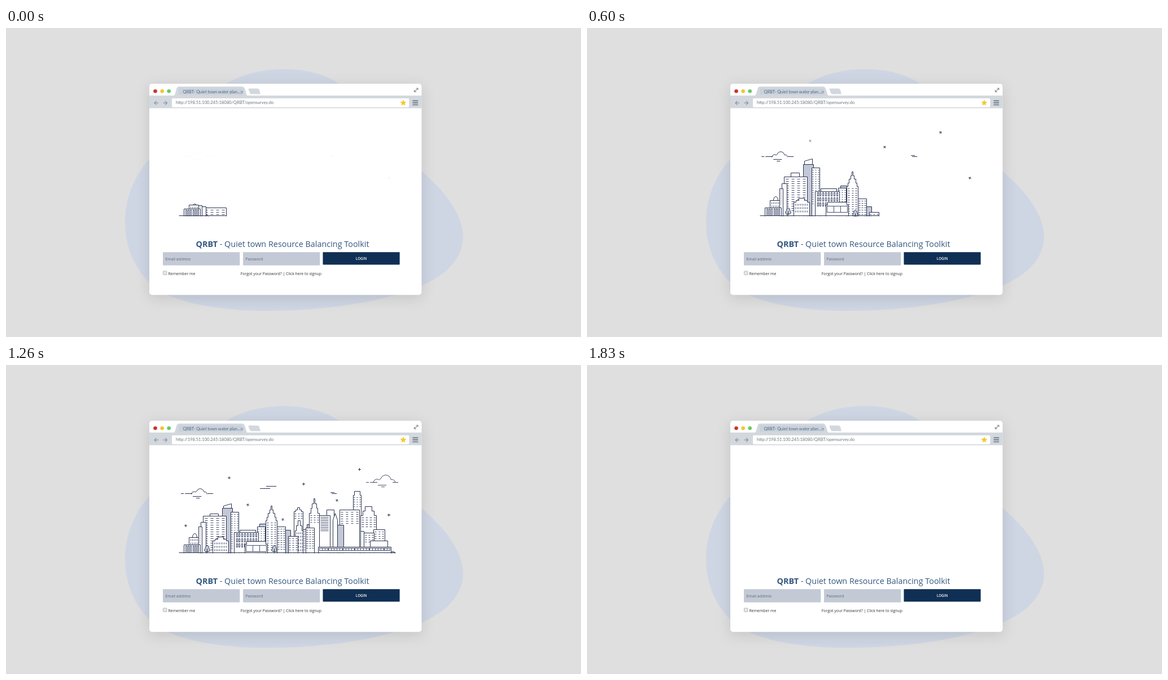
Animation of 1019x549 px, one loop 1850 ms. Source, as an HTML page with a canvas:

```html
<!DOCTYPE html>
<html lang="en">
<head>
<meta charset="utf-8">
<title>Login page skyline</title>
<style>
  html, body { margin: 0; width: 100%; height: 100%; overflow: hidden; background: #dfdfdf; }
  svg, canvas { position: absolute; left: 0; top: 0; display: block; }
  .window { filter: drop-shadow(0 5px 12px rgba(0, 0, 0, .12)); }
  .sans { font: 6.9px "Open Sans", sans-serif; fill: #333; }
  .lato { font: 7.6px Lato, sans-serif; fill: #6c747c; }
  .hint { fill: #626b7a; }
  .title { font-size: 14.4px; fill: #345880; }
  .login { font-size: 6.3px; font-weight: 600; fill: #fff; }
  .icon { fill: none; stroke: #89929b; stroke-width: 1.2; }
  .menu { stroke: #68727c; stroke-width: 1.7; }
</style>
</head>
<body>
<svg width="1019" height="549" viewBox="0 0 1019 549">
  <path fill="#cfd6e3" d="M492 73C550 73 592 90 630 135C665 185 690 215 736 254C775 287 810 330 810 371C810 405 785 436 740 456C670 488 560 503 455 502.500C360 501 280 484 250 448C222 418 211 380 211 345C211 300 228 262 254 233C300 190 320 160 352 128C390 92 435 73 492 73Z"/>
  <rect class="window" x="254" y="99" width="482.500" height="375.300" rx="5" fill="#fff"/>
  <g fill="#d3d8de">
    <rect x="254" y="120" width="482.500" height="22.500"/>
    <path d="M297 120.500C301 119 301 107 304 105Q305 104 307 104H418Q421 104 422 106C425 109 425 119 428 120.500Z"/>
    <path d="M431 107.500H446Q448 107.500 449 110L451 117.500H435Q433 117.500 432 115L429.500 109Q429.500 107.500 431 107.500Z"/>
  </g>
  <rect x="306" y="107.500" width="113" height="11" fill="#c8d1dc"/>
  <circle cx="264.500" cy="112.300" r="3.300" fill="#c9352c"/>
  <circle cx="276.700" cy="112.300" r="3.300" fill="#f3c32f"/>
  <circle cx="288.700" cy="112.300" r="3.300" fill="#62cb68"/>
  <text class="lato" x="313.500" y="116" style="font-size:7.4px;fill:#4f6478">QRBT- Quiet town water plan...</text>
  <path class="icon" d="M416 112l4 4m0-4l-4 4M724 113l6-6m-3 0h3v3m-6.500 0v3.500h3.500"/>
  <path class="icon" d="M270 133.200h-7m3.500-3.500l-3.500 3.500l3.500 3.500M278.500 133.200h7m-3.500-3.500l3.500 3.500l-3.500 3.500"/>
  <rect x="294" y="125" width="420.500" height="15.700" rx="2" fill="#fff"/>
  <text class="lato" x="301" y="135">http://198.51.100.245:18080/QRBT/opensurvey.do</text>
  <path fill="#f4c92f" d="M704 127.300L705.600 131L709.500 131.300L706.500 133.900L707.500 137.800L704 135.700L700.500 137.800L701.500 133.900L698.500 131.300L702.400 131Z"/>
  <path class="icon menu" d="M720.500 129.300h9.700m-9.700 3.600h9.700m-9.700 3.600h9.700"/>

  <text class="sans title" x="490" y="388.500" text-anchor="middle"><tspan font-weight="700">QRBT</tspan> - Quiet town Resource Balancing Toolkit</text>
  <g fill="#c3cad6">
    <rect x="278" y="398.300" width="136.300" height="23.400" rx="1"/>
    <rect x="420" y="398.300" width="136.300" height="23.400" rx="1"/>
  </g>
  <rect x="561.500" y="398.200" width="136.200" height="22.300" rx="1" fill="#102f54"/>
  <text class="sans hint" x="282.500" y="412.700">Email address</text>
  <text class="sans hint" x="424.500" y="412.700">Password</text>
  <text class="sans login" x="629.700" y="412.300" text-anchor="middle">LOGIN</text>
  <rect x="278.500" y="432" width="6.500" height="6.500" rx="1" fill="#e6e6e6" stroke="#aaa" stroke-width=".8"/>
  <text class="sans" x="287.500" y="439.300">Remember me</text>
  <text class="sans" x="415.700" y="439.300">Forgot your Password? | Click here to signup</text>
</svg>
<canvas id="city" width="1019" height="549"></canvas>
<script>
const ctx = document.getElementById('city').getContext('2d');
const LOOP = 1850, GROUND = 334, DEEP = 420;
const INK = '#29324f', PANE = '#465070', BLUE = '#c3c8d7', WHITE = '#fff';
let now = 0, reach = 0;

const clamp = v => Math.max(0, Math.min(1, v));
const progress = (start, span) => clamp((now - start) / span);
const backOut = p => 1 + 3.5 * (p - 1) ** 3 + 2.5 * (p - 1) ** 2;
const mix = (a, b, k) => a + (b - a) * k;

function line(...pts) {
  ctx.beginPath();
  for (let i = 0; i < pts.length; i += 2) ctx.lineTo(pts[i], pts[i + 1]);
  ctx.stroke();
}

function paint(fill) {
  ctx.fillStyle = fill;
  ctx.fill();
  ctx.stroke();
}

// Closes an outline far below the ground, so that no gap opens on overshoot.
function shape(pts, fill = WHITE) {
  ctx.beginPath();
  ctx.moveTo(pts[0][0], DEEP);
  for (const [x, y] of pts) ctx.lineTo(x, y);
  ctx.lineTo(pts[pts.length - 1][0], DEEP);
  paint(fill);
}

// The wave runs from left to right; each part springs up as it passes.
function rise(left, right, top, draw) {
  const p = progress(3.3 * (left - 327), 640);
  if (!p) return;
  reach = Math.max(reach, right);
  ctx.save();
  ctx.translate(0, Math.round((1 - backOut(p)) * (GROUND - top)));
  draw();
  ctx.restore();
}

function block(left, right, top, details, fill) {
  rise(left, right, top, () => {
    shape([[left, top], [right, top]], fill);
    ctx.strokeStyle = PANE;
    if (details) details(left, right, top);
  });
}

const shade = (left, right, top) => block(left, right, top, null, BLUE);

// Symmetric steps that narrow evenly from the shoulder to the peak.
function tower(cx, half, shoulder, tip, peak, steps, details) {
  rise(cx - half, cx + half, peak, () => {
    const left = [], right = [];
    let last = DEEP;
    for (let i = 0; i < steps; i++) {
      const k = i / (steps - 1);
      const w = Math.round(mix(half, tip, k)), y = Math.round(mix(shoulder, peak, k));
      left.push([cx - w, last], [cx - w, y]);
      right.unshift([cx + w, y], [cx + w, last]);
      last = y;
    }
    shape([...left, ...right]);
    ctx.strokeStyle = PANE;
    if (details) details(cx - half, cx + half, shoulder);
  });
}

// Window styles: each takes the front it has to fill.
const dashes = (rows = 99) => (left, right, top) => {
  const n = Math.round(1.5 + (right - left) / 14), gap = (right - left) / n;
  const w = Math.round(gap / 2);
  for (let i = 0; i < n; i++) {
    const x = Math.round(left + (i + .5) * gap - w / 2);
    for (let r = 0, y = top + 4; r < rows && y < GROUND - 5; r++, y += 4) line(x, y, x + w, y);
  }
};

const slits = (rows = 99) => (left, right, top) => {
  for (let x = left + 3; x < right - 1; x += 3)
    for (let r = 0, y = top + 3; r < rows && y < GROUND - 5; r++, y += 6) line(x, y, x, y + 3);
};

const blinds = (left, right, top) => {
  for (let i = 1; i < 10; i++) line(left + 2, top + i * 3, right - 3, top + i * 3);
};

const panes = (n, h, rows, pad) => (left, right, top) => {
  const gap = (right - left - 4) / n;
  for (let r = 0; r < rows; r++)
    for (let i = 0; i < n; i++)
      ctx.strokeRect(Math.round(left + 2 + i * gap + pad / 2), top + 2 + r * (h + 3), Math.round(gap - pad), h);
};

function tree(x) {
  rise(x - 4, x + 4, 320, () => {
    ctx.beginPath();
    ctx.moveTo(x - 3, 331);
    ctx.bezierCurveTo(x - 7, 329, x - 3, 326, x - 3, 324);
    ctx.bezierCurveTo(x - 3, 319, x + 3, 319, x + 3, 324);
    ctx.bezierCurveTo(x + 3, 326, x + 7, 329, x + 3, 331);
    ctx.closePath();
    paint(BLUE);
    line(x, 326, x, DEEP);
  });
}

function mound(cx, half, base, top, fill) {
  rise(cx - half, cx + half, top, () => {
    ctx.beginPath();
    ctx.ellipse(cx, base, half, base - top, 0, Math.PI, 2 * Math.PI);
    paint(fill);
  });
}

function leftBlock() {
  rise(385, 399, 246, () => shape([[385, 250], [399, 246]]));
  shade(383, 401, 254);
  block(361, 376, 264);
  block(349, 390, 268, dashes());
  block(345, 354, 279);
  block(341, 347, 287, blinds);
  mound(334, 4, 306, 299, WHITE);
  block(324, 341, 306, slits(2));
  block(315, 344, 319, panes(6, 12, 1, 2));
  tower(380, 14, 312, 5, 305, 3, slits(3));
  tree(356);
}

function middleBlock() {
  block(398, 412, 261, dashes());
  shade(449, 460, 282);
  block(445, 459, 287, dashes());
  block(414, 442, 293);
  block(404, 447, 297, panes(8, 6, 3, 3));
  shade(492, 504, 293);
  tower(470, 10, 276, 1, 250, 5, dashes());
  block(480, 495, 287, dashes());
  tower(443, 20, 318, 17, 313, 2, panes(3, 11, 1, 0));
  tree(475);
}

function centreBlock() {
  shade(533, 545, 284);
  tower(518, 8, 260, 2, 253, 3, dashes(3));
  tower(519, 7, 294, 2, 276, 3, slits());
  tower(546, 9, 266, 1, 240, 4, dashes(4));
  block(526, 533, 292, dashes());
  block(531, 546, 290, dashes());
  block(500, 517, 304, dashes());
}

function rightBlock() {
  block(568, 581, 265);
  block(555, 574, 272, blinds);
  tower(622, 7, 248, 5, 241, 2, dashes(5));
  block(591, 626, 268, dashes(6));
  shade(586, 598, 291);
  rise(579, 587, 272, () => shape([[579, 284], [583, 272], [587, 284]]));
  tower(642, 14, 278, 6, 262, 3, dashes(5));
  block(651, 671, 293, dashes(4));
  block(634, 652, 302, dashes(4));
  block(628, 634, 300);
  block(645, 676, 313);
  mound(685, 5, GROUND, 329, BLUE);
  block(553, 682, 324, panes(24, 4, 1, 0));
}

// Clouds and wisps fade in while they drift slowly to the right.
function drift(start, span, x, y, draw) {
  ctx.save();
  ctx.globalAlpha *= progress(start, span);
  ctx.translate(x + now * .0013, y);
  draw();
  ctx.restore();
}

const wisp = (x, y, w) => line(x, y, x + w, y);

function cloud(start, span, x, y, size) {
  drift(start, span, x, y, () => {
    wisp(-32, 0, 5);
    wisp(-25, 0, 13);
    wisp(15, 0, 10);
    wisp(-11, 5, 15);
    wisp(-5, 8, 6);
    ctx.translate(0, 2);
    ctx.beginPath();
    const puff = (cx, cy, r, from, to) =>
      ctx.arc(cx * size, cy * size, r * size, from * Math.PI, to * Math.PI);
    puff(-9, -1, 4.5, 1, 1.7);
    puff(2, -4, 6.7, 1.1, 1.9);
    puff(10, -1, 4, 1.4, 2);
    ctx.stroke();
  });
}

function pair(start, x, y, w, gap) {
  drift(start, 450, x, y, () => {
    wisp(gap, 0, w);
    wisp(0, 4, w);
  });
}

// Small crosses appear one after another and turn upright.
function sparkles() {
  const spots = [[678, 266], [626, 185], [527, 211], [395, 200], [318, 285], [428, 248], [490, 274], [586, 240]];
  spots.forEach(([x, y], i) => {
    const start = 90 + 130 * i;
    ctx.save();
    ctx.globalAlpha *= progress(start, 250);
    ctx.translate(x, y);
    ctx.rotate(1.3 * (1 - progress(start, 1000)) ** 2);
    line(-2.5, 0, 2.5, 0);
    line(0, -2.5, 0, 2.5);
    ctx.restore();
  });
}

function draw(t) {
  now = t < 130 ? 100 : t;
  reach = 0;
  ctx.clearRect(0, 0, 1019, 549);
  ctx.save();
  ctx.globalAlpha = 1 - clamp((t - 1750) / 80);
  ctx.translate(.5, .5);
  ctx.strokeStyle = INK;
  cloud(90, 400, 340, 228, 1);
  cloud(660, 700, 668, 208, 1.4);
  pair(660, 448, 215, 18, 11);
  drift(90, 400, 573, 226, () => {
    wisp(0, 0, 7);
    wisp(2, 2, 9);
  });
  sparkles();

  ctx.save();
  ctx.beginPath();
  ctx.rect(0, 0, 1019, GROUND);
  ctx.clip();
  leftBlock();
  middleBlock();
  centreBlock();
  rightBlock();
  ctx.restore();

  line(306, GROUND - 1, reach, GROUND - 1);
  ctx.globalAlpha *= .6 * progress(1300, 250);
  line(566, GROUND, 594, GROUND);
  ctx.restore();
}

const begin = performance.now();
function tick() {
  draw((performance.now() - begin) % LOOP);
  requestAnimationFrame(tick);
}
draw(0);
requestAnimationFrame(tick);
</script>
</body>
</html>
```
